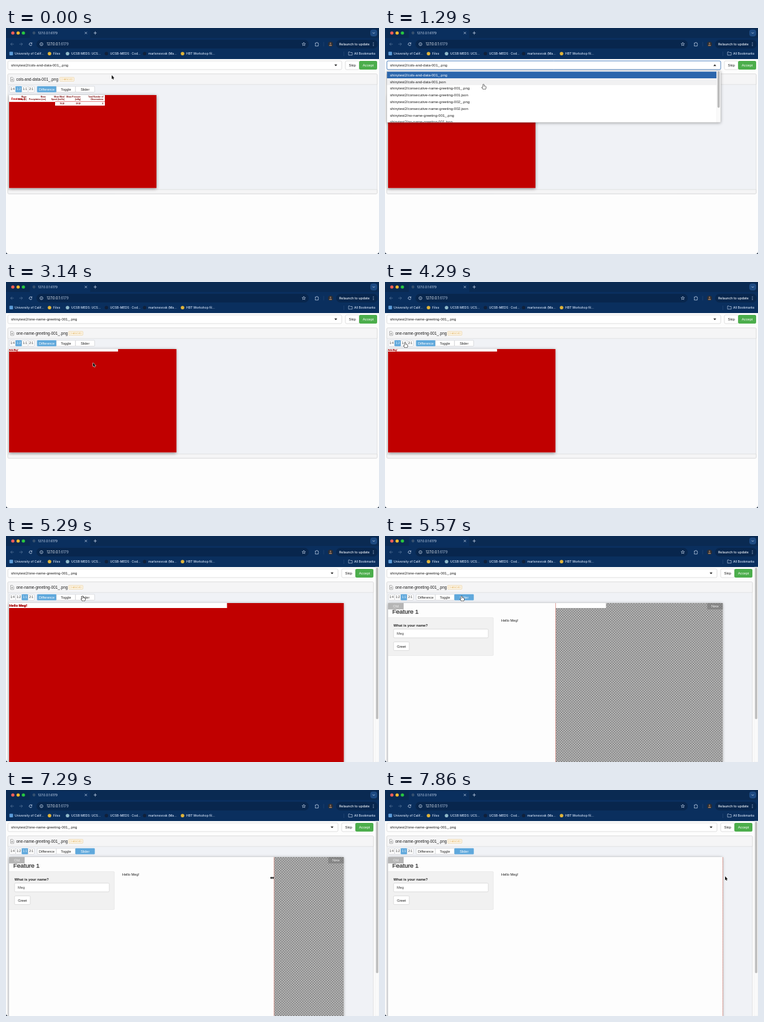
Animation, 600 px wide and 364 px high, one loop 8000 ms. Source, as an HTML page with a canvas:

```html
<!DOCTYPE html>
<html lang="en">
<head>
<meta charset="utf-8">
<title>Snapshot review</title>
<style>
html, body { margin: 0; height: 100%; overflow: hidden; background: #fdfdfd; }
canvas { display: block; width: 600px; height: 364px; }
</style>
</head>
<body>
<canvas id="stage"></canvas>
<script>
const W = 600, H = 364, LOOP = 8000, FPS = 7;
const UI = 'Inter, sans-serif', PAGE = '"Liberation Sans", Arial, sans-serif';
const RED = '#c00000', BLUE = '#5fa8dc', BORDER = '#d4d4d6';
const canvas = document.getElementById('stage'), c = canvas.getContext('2d');
const dpr = window.devicePixelRatio || 1;
canvas.width = W * dpr;
canvas.height = H * dpr;

// Cursor stops: step, x, y
const path = [[0, 170, 76], [3, 163, 60], [6, 161, 62], [9, 158, 91], [12, 150, 112], [16, 143, 126],
  [20, 140, 130], [22, 140, 130], [25, 115, 124], [29, 34, 99], [30, 32, 98], [32, 32, 98], [36, 123, 97],
  [40, 123, 97], [43, 210, 128], [46, 265, 142], [47, 271, 142], [54, 546, 141], [55, 547, 139]];
const OPEN = 4, PICK = 21, ZOOM = 32, SLIDE = 39, GRAB = 47;
const files = ['cols-and-data-001', 'consecutive-name-greeting-001', 'consecutive-name-greeting-002',
  'no-name-greeting-001', 'one-name-greeting-001'].flatMap(n => [n + '_.png', n + '.json']);

const clamp = (v, a, b) => Math.min(b, Math.max(a, v));
const smooth = (v, a, b) => { const u = clamp((v - a) / (b - a), 0, 1); return u * u * (3 - 2 * u); };

function cursorAt(step) {
  const i = Math.max(1, path.findIndex(p => p[0] >= step));
  const [s0, x0, y0] = path[i - 1], [s1, x1, y1] = path[i];
  const u = (step - s0) / (s1 - s0);
  return [x0 + (x1 - x0) * u, y0 + (y1 - y0) * u];
}

function box(x, y, w, h, fill, stroke, r = 0, lw = 0.6) {
  c.beginPath();
  c.roundRect(x, y, w, h, r);
  if (fill) { c.fillStyle = fill; c.fill(); }
  if (stroke) { c.strokeStyle = stroke; c.lineWidth = lw; c.stroke(); }
}
function dot(x, y, r, fill, stroke, lw = 0.7) { box(x - r, y - r, 2 * r, 2 * r, fill, stroke, r, lw); }
function text(s, x, y, size, color, font = PAGE, weight = 400, align = 'left') {
  c.font = `${weight} ${size}px ${font}`;
  c.textAlign = align;
  c.fillStyle = color;
  c.fillText(s, x, y);
}
function line(points, color, lw = 0.7) {
  c.beginPath();
  for (let i = 0; i < points.length; i += 2) c.lineTo(points[i], points[i + 1]);
  c.strokeStyle = color;
  c.lineWidth = lw;
  c.stroke();
}
function shape(d, x, y, fill, stroke, lw = 0.7) {
  c.save();
  c.translate(x, y);
  const p = new Path2D(d);
  c.lineJoin = 'round';
  if (stroke) { c.strokeStyle = stroke; c.lineWidth = lw; c.stroke(p); }
  if (fill) { c.fillStyle = fill; c.fill(p); }
  c.restore();
}
function shadowed(blur, alpha, draw) {
  c.save();
  c.shadowColor = `rgba(0,0,0,${alpha})`;
  c.shadowBlur = blur * dpr;
  c.shadowOffsetY = dpr;
  draw();
  c.restore();
}

function browser() {
  const pale = '#d5e3f7', dim = '#5f7da3';
  box(0, 0, W, 16, '#0a2a52');
  box(0, 16, W, 34, '#0a2f5e');
  box(38.5, 1.5, 97, 18, '#0a2f5e', null, 4);
  ['#ff5f57', '#febc2e', '#28c840'].forEach((f, i) => dot(11 + i * 8.5, 8, 2.6, f));
  dot(45, 8, 2.4, '#35506f');
  text('127.0.0.1:6179', 51.5, 9.8, 5, pale, UI);
  line([126.8, 6.3, 130.2, 9.7], pale);
  line([130.2, 6.3, 126.8, 9.7], pale);
  line([141, 8, 146, 8], pale);
  line([143.5, 5.5, 143.5, 10.5], pale);
  box(586, 2.5, 11, 11, '#1d4a82', null, 4);
  line([589.8, 7.2, 591.5, 9, 593.2, 7.2], pale);

  shape('M5 0H0M2.3 -2.3L0 0L2.3 2.3', 7.5, 26, null, dim);
  shape('M0 0H5M2.7 -2.3L5 0L2.7 2.3', 21.5, 26, null, dim);
  shape('M1.8 -1.3A2.2 2.2 0 1 0 2.2 .6M2.2 -2.6V-.9H.5', 39.5, 26, null, pale, 0.8);
  box(49, 19, 438, 14, '#08264d', null, 7);
  dot(57, 26, 2.4, null, pale);
  line([57, 25.8, 57, 27.3], pale);
  line([57, 24.6, 57, 25.2], pale);
  text('127.0.0.1', 65.5, 27.9, 5.6, '#f0f5fc', UI);
  const hostWidth = c.measureText('127.0.0.1').width;
  text(':6179', 65.5 + hostWidth, 27.9, 5.6, '#a9bcd6', UI);
  shape('M0 -2.8L.8 -.9L2.8 -.8L1.2 .5L1.8 2.4L0 1.3L-1.8 2.4L-1.2 .5L-2.8 -.8L-.8 -.9Z', 479, 26, null, pale, 0.6);
  shape('M-2.5 -1.8H-.8A1 1 0 0 1 1.2 -1.8H2.3V0A1 1 0 0 1 2.3 1.6V3H-2.5V1.4A.9 .9 0 0 0 -2.5 -.2Z', 500, 26, null, pale);
  line([511, 22.5, 511, 29.5], '#31527e', 0.5);
  dot(522, 26, 4, '#2b2d34');
  dot(522, 24.8, 1.3, '#8a6d58');
  shape('M-2.4 3A2.4 2.4 0 0 1 2.4 3Z', 522, 26, '#8a6d58');
  box(531, 19, 67, 14, '#08264d', null, 7);
  text('Relaunch to update', 536, 27.9, 5.3, '#f0f5fc', UI, 500);
  for (const y of [23.8, 26, 28.2]) dot(591, y, 0.6, pale);

  const marks = [['University of Calif...', 14, '#5b9bd8'], ['Files', 76, '#e0b43a'], ['UCSB MEDS: UCS...', 105, '#8fb9c9'],
    ['UCSB-MEDS · Cod...', 167.5, '#10203a'], ['marlenevosk (Ma...', 229, '#10203a'], ['HBT Workshop fil...', 290, '#e0b43a']];
  marks.forEach(([label, x, color], i) => {
    if (i) dot(x - 6, 41.2, 2.8, color);
    else box(5.5, 38.3, 5.8, 5.8, color, null, 1);
    text(label, x, 43, 5, pale, UI, 500);
  });
  line([543.5, 38, 543.5, 45], '#31527e', 0.5);
  shape('M0 0H2.2L3 .8H6V5H0Z', 551, 38.7, null, pale, 0.6);
  text('All Bookmarks', 560, 43, 5, pale, UI, 500);
}

function picker(step, right) {
  const open = step >= OPEN && step < PICK;
  const chosen = files[step < PICK ? 0 : 8];
  box(3, 53, right - 3, 14, '#fff', open ? '#2a69b2' : '#ccc', 2, open ? 0.8 : 0.6);
  text('shinytest2/' + chosen, 8, 62, 6, '#222');
  const x = right - 9.5;
  shape(open ? 'M-2.3 1.2H2.3L0 -1.4Z' : 'M-2.3 -1.2H2.3L0 1.4Z', x, 60, '#222');
  box(right + 6, 53, 22, 14, '#fff', '#ccc', 2);
  box(right + 28, 53, 29, 14, '#4cae4c', null, 2);
  text('Skip', right + 17.2, 62, 5.8, '#222', PAGE, 400, 'center');
  text('Accept', right + 42.5, 62, 5.8, '#fff', PAGE, 400, 'center');
}

function dropdown(step, my) {
  const scroll = 26 * smooth(step, 11, 16), pitch = 10.8;
  shadowed(5, 0.35, () => box(3, 69, 537, 83, '#fff', null, 1));
  c.save();
  c.beginPath();
  c.rect(3, 69, 537, 83);
  c.clip();
  const hover = Math.floor((my - 70.3 + scroll) / pitch);
  files.forEach((name, i) => {
    const y = 70.3 + i * pitch - scroll;
    if (!i || i === hover) box(3, y, 530.5, pitch, i ? '#f1f1f2' : '#2b66ac');
    text('shinytest2/' + name, 8, y + 7.5, 6, i ? '#222' : '#fff');
  });
  box(533.5, 69, 6.5, 83, '#fafafa', '#e8e8e8', 0, 0.4);
  box(534.8, 69.5 + scroll * 0.88, 3.6, 59, '#bbb', null, 1.8);
  c.restore();
  box(3, 69, 537, 83, null, '#c8c8c8', 1, 0.5);
}

function segments(labels, x, w, size, active) {
  labels.forEach((label, i) => {
    box(x + i * w, 94, w, 9.3, i === active ? BLUE : '#fff', i === active ? BLUE : '#bfc1c5', 0.8, 0.5);
    text(label, x + (i + 0.5) * w, 98.7 + size * 0.35, size, i === active ? '#fff' : '#222', PAGE, 400, 'center');
  });
}

function tableDiff() {
  box(5, 108, 237, 149.7, RED);
  box(5, 108, 154, 11, '#fff');
  box(79, 118, 80, 7, '#fff');
  text('Feature 1', 8.5, 116.2, 5, RED, PAGE, 700);
  const heads = [['Mean', 'Temp (C)', 33], ['Mean', 'Precipitation (cm)', 64], ['Mean Wind', 'Speed (km/hr)', 94],
    ['Mean Pressure', '(inHg)', 120], ['Total Number of', 'Observations', 156.5]];
  for (const [a, b, x] of heads) {
    text(a, x, 112, 3.2, '#7a0000', PAGE, 700, 'right');
    text(b, x, 116, 3.2, '#7a0000', PAGE, 700, 'right');
  }
  c.setLineDash([1, 1]);
  line([5, 119, 79, 119], '#e9a0a0', 0.6);
  c.setLineDash([]);
  line([79, 118.4, 159, 118.4], RED, 0.5);
  [['78.26', 94], ['29.92', 120], ['4', 156.5]].forEach(([s, x]) => text(s, x, 122.8, 3, '#7a0000', PAGE, 700, 'right'));
}

function greetingDiff(k) {
  box(5, 108, 538.4 * k, 333 * k, RED);
  box(5, 107.8, 350.5 * k, 8.2 * k, '#fff');
  text('Hello Meg!', 5, 108 + 6.4 * k, 5.8 * k, RED, PAGE, 700);
  text('Hello Meg!', 5 + 0.4 * k, 108 + 6.2 * k, 5.8 * k, '#8c0000', PAGE, 400);
}

const tile = new OffscreenCanvas(4, 4), tc = tile.getContext('2d');
tc.fillStyle = '#bcbcbc';
tc.fillRect(0, 0, 4, 4);
tc.fillStyle = '#858585';
tc.fillRect(0, 0, 2, 2);
tc.fillRect(2, 2, 2, 2);
const checker = c.createPattern(tile, 'repeat');
checker.setTransform(new DOMMatrix().scale(1.04));

function tag(label, x) {
  box(x, 108, 25, 10.3, 'rgba(110,110,110,.5)');
  text(label, x + 12.5, 115, 5.8, '#eee', PAGE, 400, 'center');
}

function slider(split) {
  box(5, 108, 538.4, 256, checker);
  box(5, 108, 350.5, 8, '#fff');
  tag('New', 518.4);
  c.save();
  c.beginPath();
  c.rect(5, 108, split - 5, 256);
  c.clip();
  box(5, 108, 539, 256, '#fdfdfd');
  c.strokeStyle = '#333';
  c.lineWidth = 0.25;
  text('Feature 1', 11.8, 125.3, 9.9, '#222');
  c.strokeText('Feature 1', 11.8, 125.3);
  box(4, 131.5, 170.3, 61, '#f1f1f1', '#e2e2e2', 1);
  text('What is your name?', 13.8, 146, 5.8, '#222', PAGE, 700);
  box(13.8, 150, 152.3, 14, '#fff', '#ccc', 1.7);
  text('Meg', 19, 159.2, 5.8, '#444');
  box(13.8, 170.5, 25.2, 14, '#fff', '#ccc', 1.7);
  text('Greet', 26.4, 179.6, 5.8, '#222', PAGE, 400, 'center');
  text('Hello Meg!', 186.7, 137.7, 5.8, '#222');
  tag('Old', 5);
  c.restore();
  line([split, 108, split, H], '#d98d85', 0.8);
}

function review(step, split, right) {
  const first = step < PICK, large = step >= ZOOM;
  const k = large ? 1 : 0.5, w = first ? 237 : 538.4 * k, h = first ? 149.7 : 333 * k;
  const foot = 108 + h + 2.5, name = files[first ? 0 : 8];
  box(3, 74, right - 3, foot + 7 - 74, '#f0f2f6', BORDER, 1.5);
  box(3, 74, right - 3, 17, '#f5f5f6', BORDER, [1.5, 1.5, 0, 0]);
  box(3, foot, right - 3, 6.7, '#f5f5f6', BORDER, [0, 0, 1.5, 1.5]);
  shape('M0 0H3.2L4.8 1.6V6H0Z', 7.6, 79.8, '#fff', '#333', 0.7);
  line([8.8, 82.5, 11, 82.5], '#333', 0.6);
  line([8.8, 84.2, 11, 84.2], '#333', 0.6);
  text(name, 16.5, 84.7, 6.4, '#222');
  const bx = first ? 86.6 : 100.8;
  box(bx, 79.6, 22.8, 6, '#fffdf8', '#e2b967', 0.8, 0.5);
  text('CHANGED', bx + 11.4, 84, 4, '#dda544', PAGE, 400, 'center');
  segments(['1:4', '1:2', '1:1', '2:1'], 5.5, 10, 4.7, large ? 2 : 1);
  segments(['Difference', 'Toggle', 'Slider'], 50.2, 30.8, 5.5, step >= SLIDE ? 2 : 0);
  shadowed(5, 0.4, () => box(5, 108, w, h, '#fff'));
  if (first) tableDiff();
  else if (step < SLIDE) greetingDiff(k);
  else slider(split);
}

function cursor(step, x, y) {
  const hand = step >= 7 && step < PICK || step >= 29 && step < 42 && y < 103;
  if (step >= 45 && step < 55) {
    shape('M-3.2 0L-1 -2.2V-.8H1V-2.2L3.2 0L1 2.2V.8H-1V2.2Z', x, y, '#111', '#fff', 0.8);
  } else if (hand) {
    shape('M0 0Q.9 -.3 1.1 .7V2.8Q3.8 2.7 4.3 3.9V5.6L3.4 7.4H0L-2 4.8Q-1.9 3.8 -.5 4.6V.7Z', x, y, '#fff', '#111', 1.1);
  } else {
    shape('M0 0V6.2L1.4 5L2.3 7.1L3.4 6.6L2.5 4.6H4.4Z', x, y, '#111', '#fff', 1);
  }
}

function draw(step) {
  const [x, y] = cursorAt(step);
  const narrow = step >= ZOOM ? 6 : 0;
  const split = step <= GRAB ? 274.5 : clamp(x + 3, 274.5, 543.4);
  c.setTransform(dpr, 0, 0, dpr, 0, 0);
  box(0, 0, W, H, '#0a1a30');
  box(0, 0, W, H, '#fdfdfd', null, [0, 0, 4, 4]);
  browser();
  review(step, split, 597 - narrow);
  picker(step, 540 - narrow);
  if (step >= OPEN && step < PICK) dropdown(step, y);
  if (narrow) {
    box(594, 50, 6, H - 50, '#fafafa', '#e6e6e6', 0, 0.4);
    box(595.2, 51, 3.6, 244, '#bdbdbd', null, 1.8);
  }
  cursor(step, x, y);
}

function tick() {
  // The picture advances in steps of one seventh of a second
  draw(Math.floor((performance.now() % LOOP) * FPS / 1000 + 0.03));
  requestAnimationFrame(tick);
}
tick();
</script>
</body>
</html>
```
